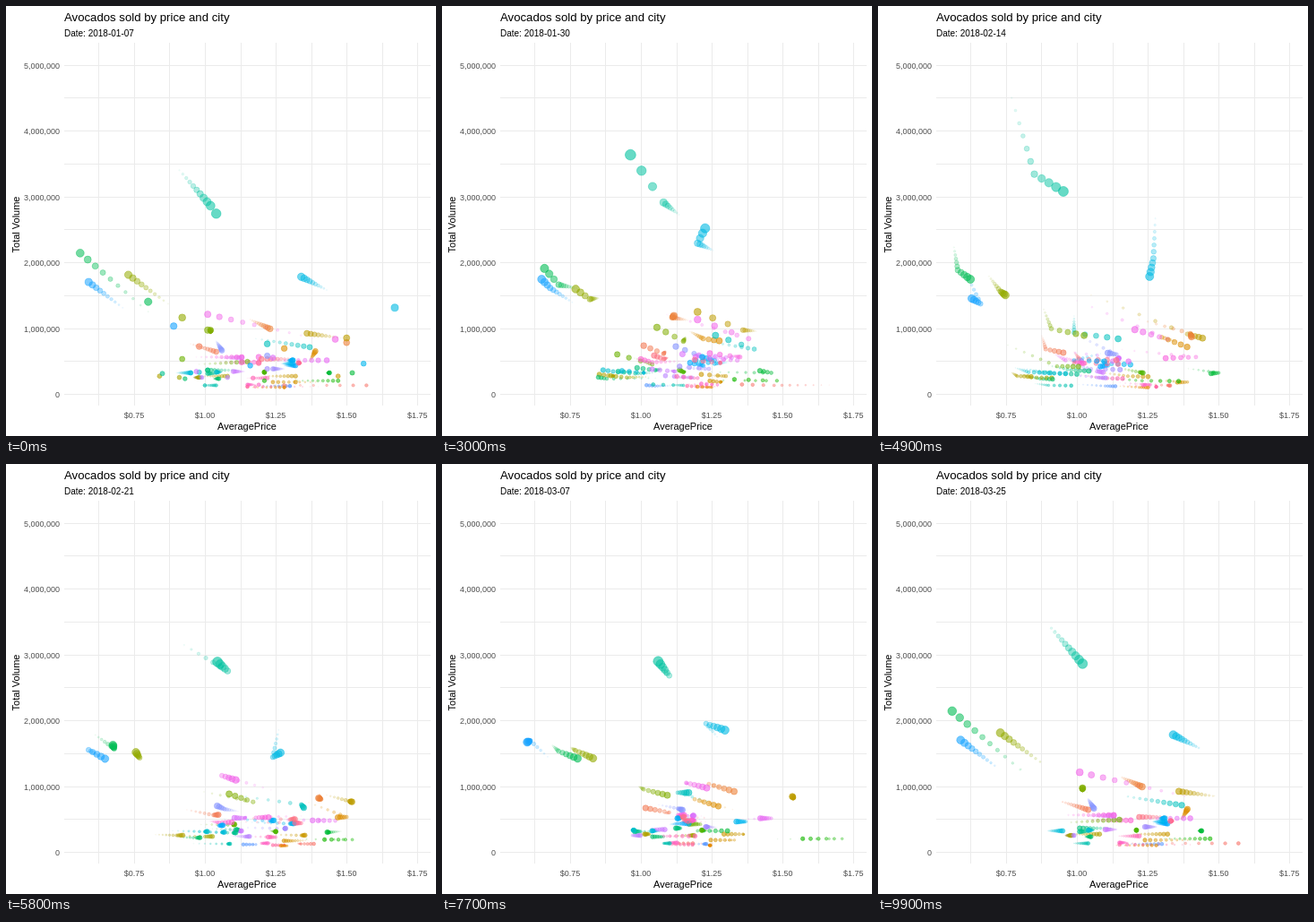
Write an HTML page with a canvas that moves like this. It is 480x480 px and loops after 10 s.

```html
<!DOCTYPE html>
<html lang="en">
<head>
<meta charset="utf-8">
<title>Avocados sold by price and city</title>
<style>
html, body { margin: 0; width: 100%; height: 100%; overflow: hidden; background: #fff; }
canvas { display: block; width: 480px; height: 480px; }
</style>
</head>
<body>
<canvas id="chart" width="480" height="480"></canvas>
<script>
const ctx = document.getElementById('chart').getContext('2d');
const FONT = '"Liberation Sans", Arial, sans-serif';
const STEPS = 100, STEP_MS = 100, WEEK = 9, WAKE = 10, ALPHA = 0.6;
const CITIES = 45;
const START = Date.UTC(2018, 0, 7), DAY = 864e5;
const MIN_VOL = 8, MAX_VOL = 508;

// Cents and units of 10,000 to pixels
const px = cents => 222 + (cents - 100) * 3.164;
const py = vol => 433 - vol * 0.7345;

// Evenly spaced hues at equal lightness and chroma (polar LUV)
function hue(i) {
  const L = 65, C = 100, h = (15 + 360 * i / CITIES) * Math.PI / 180;
  const Y = ((L + 16) / 116) ** 3;
  const u = C * Math.cos(h) / (13 * L) + 0.1978;
  const v = C * Math.sin(h) / (13 * L) + 0.4683;
  const X = 9 * Y * u / (4 * v), Z = Y * (12 - 3 * u - 20 * v) / (4 * v);
  const rgb = [
    3.2406 * X - 1.5372 * Y - 0.4986 * Z,
    -0.9689 * X + 1.8758 * Y + 0.0415 * Z,
    0.0557 * X - 0.204 * Y + 1.057 * Z
  ].map(c => {
    c = Math.min(1, Math.max(0, c));
    return Math.round(255 * (c <= 0.00304 ? 12.92 * c : 1.055 * c ** (1 / 2.4) - 0.055));
  });
  return `rgb(${rgb})`;
}

const cities = [];
const city = (i, price, vol) => cities.push({ i, color: hue(i), price, vol });

// Small markets share one weekly demand curve
const DEMAND = [1, 0.98, 1.05, 1, 1.3, 1, 0.93, 0.95, 1, 1, 1, 1];
const small = (i, base, ...price) => city(i, price, DEMAND.map(d => d * base));

city(20, [104, 128, 115, 108, 73, 85, 108, 100, 110, 103, 91, 102],
  [274, 242, 267, 291, 508, 334, 275, 306, 268, 307, 340, 286]);
city(25, [167, 167, 127, 120, 128, 127, 124, 130, 123, 135, 143, 134],
  [131, 131, 215, 229, 297, 206, 144, 159, 195, 177, 158, 178]);
city(16, [80, 94, 79, 71, 56, 58, 68, 67, 71, 83, 80, 56],
  [140, 135, 159, 166, 240, 188, 157, 169, 153, 133, 125, 214]);
city(10, [92, 95, 86, 82, 67, 73, 77, 74, 77, 88, 87, 73],
  [116, 133, 146, 144, 190, 156, 143, 162, 154, 133, 137, 181]);
city(29, [89, 84, 78, 68, 59, 66, 59, 72, 61, 59, 71, 59],
  [103, 136, 133, 161, 201, 137, 155, 125, 169, 165, 131, 170]);
city(37, [146, 122, 101, 138, 84, 132, 106, 117, 116, 129, 138, 101],
  [83, 112, 131, 84, 171, 83, 116, 101, 105, 91, 85, 121]);
city(2, [150, 151, 118, 111, 113, 140, 141, 139, 124, 140, 116, 123],
  [78, 78, 111, 116, 124, 92, 80, 84, 103, 83, 113, 99]);
city(7, [150, 165, 142, 136, 88, 139, 151, 153, 154, 153, 148, 136],
  [85, 78, 95, 97, 180, 91, 77, 75, 82, 86, 85, 92]);
city(4, [128, 145, 116, 122, 139, 130, 150, 143, 119, 134, 137, 139],
  [69, 62, 98, 84, 74, 86, 53, 52, 80, 61, 50, 65]);
city(11, [101, 107, 116, 115, 87, 91, 117, 98, 101, 116, 102, 102],
  [97, 103, 88, 80, 143, 99, 76, 103, 95, 79, 92, 97]);
city(22, [122, 142, 120, 140, 99, 99, 134, 136, 113, 120, 118, 137],
  [76, 68, 82, 68, 131, 93, 72, 61, 90, 90, 84, 71]);
city(1, [98, 120, 109, 108, 87, 89, 103, 107, 110, 95, 95, 104],
  [72, 62, 66, 61, 98, 68, 56, 57, 60, 72, 76, 64]);
city(31, [122, 106, 117, 122, 93, 114, 107, 101, 113, 116, 104, 106],
  [58, 73, 63, 56, 104, 60, 65, 76, 66, 62, 80, 66]);
city(12, [92, 119, 96, 104, 67, 93, 110, 111, 121, 114, 98, 115],
  [53, 42, 57, 45, 90, 42, 41, 43, 42, 43, 45, 49]);

small(0, 13, 128, 108, 172, 147, 113, 132, 134, 144, 110, 125, 115, 157);
small(3, 10, 128, 145, 121, 125, 110, 122, 129, 124, 124, 125, 114, 128);
small(5, 18, 132, 135, 129, 128, 117, 139, 131, 124, 133, 118, 141, 124);
small(6, 27, 147, 118, 123, 130, 104, 118, 134, 137, 136, 124, 120, 132);
small(8, 27, 84, 105, 91, 90, 76, 79, 90, 95, 103, 100, 99, 108);
small(9, 25, 91, 99, 105, 95, 78, 84, 100, 106, 117, 120, 96, 98);
small(13, 33, 121, 126, 116, 115, 111, 122, 125, 125, 122, 121, 121, 121);
small(14, 20, 121, 126, 114, 148, 103, 123, 152, 130, 171, 146, 131, 147);
small(15, 32, 152, 148, 119, 146, 134, 150, 144, 142, 120, 139, 143, 144);
small(17, 23, 93, 104, 110, 88, 79, 87, 97, 100, 108, 101, 103, 105);
small(18, 36, 101, 104, 108, 105, 86, 98, 112, 110, 114, 111, 112, 101);
small(19, 31, 85, 102, 107, 98, 80, 92, 110, 112, 100, 96, 105, 101);
small(21, 13, 100, 106, 109, 115, 83, 90, 108, 110, 108, 112, 99, 104);
small(23, 33, 98, 100, 102, 92, 76, 83, 100, 102, 97, 98, 106, 104);
small(24, 32, 95, 98, 101, 101, 78, 88, 106, 108, 105, 103, 90, 95);
small(26, 46, 156, 153, 132, 126, 106, 110, 130, 133, 137, 131, 127, 131);
small(27, 51, 131, 116, 119, 126, 113, 99, 123, 126, 114, 112, 129, 131);
small(28, 43, 116, 114, 119, 122, 108, 111, 105, 108, 113, 120, 128, 132);
small(30, 12, 130, 110, 113, 105, 96, 110, 118, 108, 122, 124, 118, 130);
small(32, 38, 122, 121, 112, 124, 93, 105, 128, 129, 124, 122, 128, 124);
small(33, 25, 108, 116, 108, 118, 90, 107, 114, 118, 97, 102, 96, 99);
small(34, 34, 97, 116, 110, 112, 88, 107, 112, 114, 104, 112, 114, 110);
small(35, 55, 124, 110, 114, 132, 80, 115, 114, 106, 118, 119, 104, 113);
small(36, 51, 143, 142, 113, 134, 90, 96, 146, 128, 146, 139, 119, 140);
small(38, 56, 119, 123, 131, 135, 103, 142, 118, 128, 113, 117, 97, 113);
small(39, 48, 113, 124, 118, 104, 92, 100, 105, 115, 119, 117, 104, 119);
small(40, 14, 119, 112, 109, 127, 110, 126, 120, 125, 110, 115, 118, 115);
small(41, 24, 117, 119, 109, 120, 98, 109, 125, 119, 108, 128, 115, 122);
small(42, 11, 115, 121, 130, 121, 107, 128, 128, 119, 111, 124, 140, 115);
small(43, 47, 119, 117, 128, 128, 101, 99, 134, 129, 115, 118, 134, 133);
small(44, 53, 120, 108, 110, 108, 98, 101, 130, 134, 113, 117, 133, 122);
cities.sort((a, b) => a.i - b.i);

function at(list, step) {
  const k = Math.floor(step / WEEK), f = step / WEEK - k;
  return f ? list[k] + (list[k + 1] - list[k]) * f : list[k];
}

function dot(c, step, fade) {
  const vol = at(c.vol, step);
  const share = Math.max(0, (vol - MIN_VOL) / (MAX_VOL - MIN_VOL));
  const size = (1 + 5 * Math.sqrt(share)) * fade;
  ctx.globalAlpha = ALPHA * fade;
  ctx.fillStyle = ctx.strokeStyle = c.color;
  ctx.lineWidth = 0.75;
  ctx.beginPath();
  ctx.arc(px(at(c.price, step)), py(vol), 0.375 * (size * 2.845 + 0.945), 0, 7);
  ctx.fill();
  ctx.stroke();
}

function text(str, x, y, size, color = '#000', align = 'left') {
  ctx.font = `${size}px ${FONT}`;
  ctx.fillStyle = color;
  ctx.textAlign = align;
  ctx.fillText(str, x, y);
}

function frame(step) {
  ctx.globalAlpha = 1;
  ctx.fillStyle = '#fff';
  ctx.fillRect(0, 0, 480, 480);

  ctx.fillStyle = '#ebebeb';
  for (let c = 62.5; c <= 175; c += 12.5) ctx.fillRect(Math.round(px(c)), 41, 1, 405);
  for (let v = 0; v <= 500; v += 50) ctx.fillRect(65, Math.round(py(v)), 409, 1);

  for (let lag = WAKE; lag >= 0; lag--) {
    const s = (step - lag + STEPS) % STEPS;
    for (const c of cities) dot(c, s, 1 - lag / (WAKE + 1));
  }

  ctx.globalAlpha = 1;
  for (let m = 0; m <= 5; m++)
    text(m ? m + ',000,000' : '0', 60, py(m * 100) + 4, 9, '#4d4d4d', 'right');
  for (let c = 75; c <= 175; c += 25)
    text('$' + (c / 100).toFixed(2), px(c), 460, 9, '#4d4d4d', 'center');
  text('AveragePrice', 269, 473, 11, '#000', 'center');
  ctx.save();
  ctx.translate(15, 244);
  ctx.rotate(-Math.PI / 2);
  text('Total Volume', 0, 0, 11, '#000', 'center');
  ctx.restore();

  const day = Math.floor(step * 77 / 99 + 1e-6);
  const date = new Date(START + day * DAY).toISOString().slice(0, 10);
  text('Avocados sold by price and city', 65, 17, 13.2);
  text('Date: ' + date, 65, 34, 10);
}

function tick() {
  frame(Math.floor(performance.now() / STEP_MS) % STEPS);
  requestAnimationFrame(tick);
}
tick();
</script>
</body>
</html>
```
